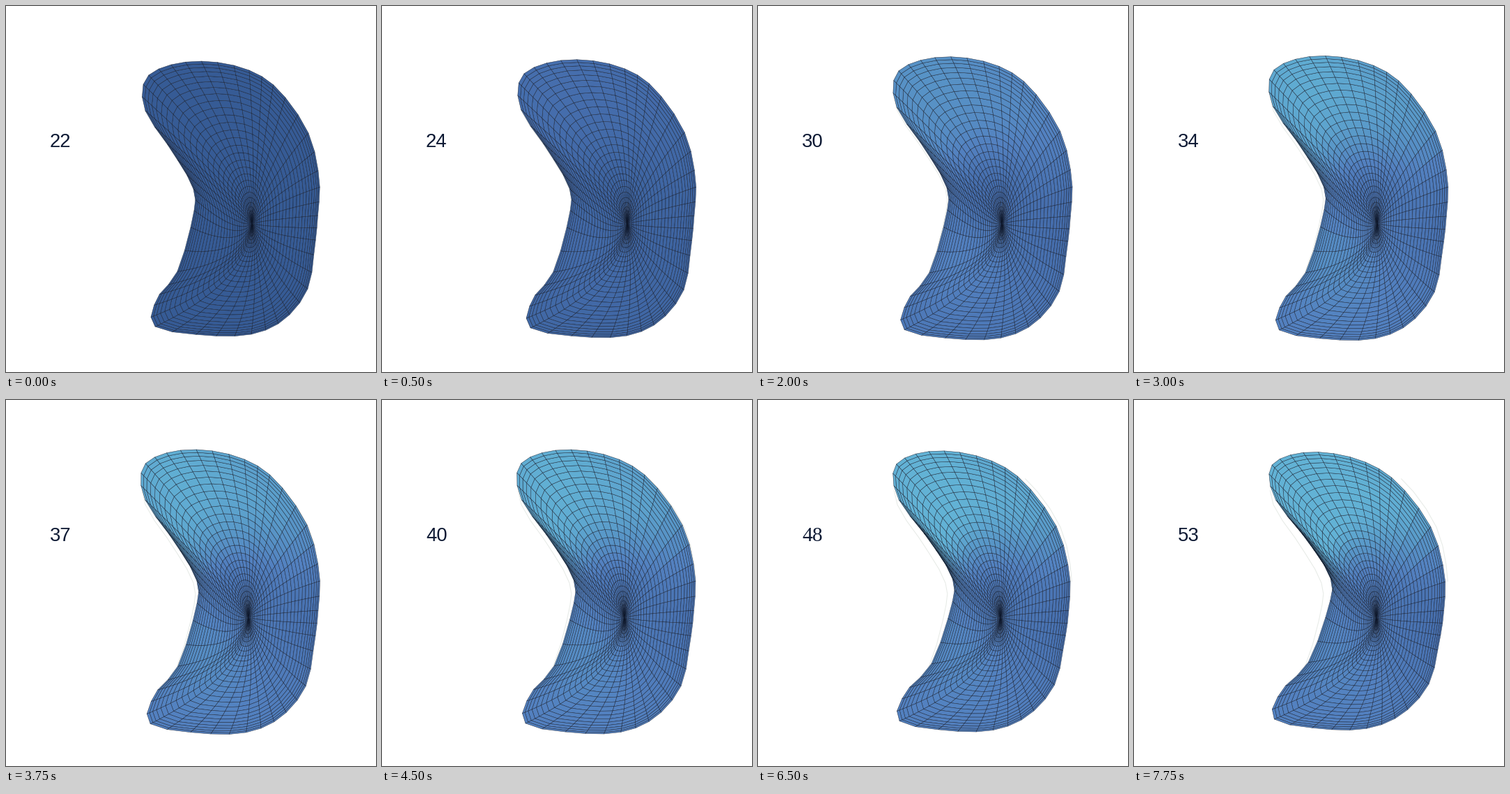
Write a matplotlib script that moves like this. It is 531x524 px and loops after 8000 ms.

```python
import numpy as np
import matplotlib.pyplot as plt
from matplotlib.animation import FuncAnimation
from matplotlib.collections import PolyCollection
from matplotlib.colors import LinearSegmentedColormap

W, H, DPI = 531, 524, 100
PX = 72 / DPI
FIRST, COUNT = 22, 32
SPOKES, RINGS = 50, 30

# Key points of the rim, clockwise from below the upper tip
KEYS = np.array([
    (200, 150), (200, 105), (237, 84), (292, 79.5), (349, 92), (392, 121),
    (434, 182), (449.5, 248), (447.5, 300), (443, 345), (433, 405), (399, 449),
    (352, 470), (288, 471.5), (214, 459), (216, 420), (246, 380), (268, 303),
    (269, 262), (239, 209)])

# Light and dark patches: x, y, radius, strength, extra strength by the end
PATCHES = [
    (235, 90, 105, .32, .12),
    (400, 160, 65, .10, .16),
    (255, 215, 45, .00, .25),
    (290, 365, 50, .20, -.12),
    (320, 262, 42, -.26, .06),
    (445, 310, 65, -.16, -.06)]

BLUES = LinearSegmentedColormap.from_list("blues", [
    (0, "#365b95"), (.35, "#456dac"), (.6, "#5381c0"), (.8, "#5896c7"),
    (1, "#62b2d5")])

# Angle of each spoke; the ninth points straight up
PHI = np.pi / 2 - 2 * np.pi * (np.arange(SPOKES) - 8) / SPOKES


def closed_spline(keys, count):
    """Catmull-Rom curve through a closed loop of points."""
    pos = np.arange(count) * len(keys) / count
    i = pos.astype(int)
    t = (pos - i)[:, None]
    a, b, c, d = (keys[(i + k) % len(keys)] for k in (-1, 0, 1, 2))
    return b + .5 * t * (c - a + t * (2*a - 5*b + 4*c - d + t * (3*(b - c) + d - a)))


RIM = closed_spline(KEYS, SPOKES)


def rim_at(u):
    """The rim drifts with u and swells for a while on the way."""
    drift = np.stack([-6 - 8*np.cos(PHI) + 11*np.cos(2*PHI) + 2*np.sin(2*PHI),
                      -2.5 + 4*np.cos(PHI) - 1.5*np.sin(PHI)], axis=1)
    swell = np.sin(np.pi * u ** .8)
    rim = RIM + drift * u ** 1.2
    return rim + swell * (rim - (325, 280)) * (.014, .031)


def quads_at(u):
    """Faces between rings that grow from narrow ellipses into the rim."""
    pole = np.array([353 - 5 * min(1, 2.2 * u), 311.5])
    core = np.stack([45 * np.cos(PHI), -175 * np.sin(PHI)], axis=1)
    t = np.linspace(0, 1, RINGS + 1)
    g = (.35 * t + .325 * (1 - np.cos(np.pi * t)))[:, None, None]
    p = pole + g * ((1 - g) * core + g * (rim_at(u) - pole))
    q = np.roll(p, -1, axis=1)
    return np.stack([p[:-1], q[:-1], q[1:], p[1:]], axis=2).reshape(-1, 4, 2)


def colors_at(u, quads):
    x, y = quads.mean(axis=1).T
    tone = np.full(len(x), .58)
    for px, py, r, strength, extra in PATCHES:
        d2 = (x - px) ** 2 + (y - py) ** 2
        tone += (strength + extra * u) * np.exp(-d2 / (2 * r * r))
    return BLUES(tone * min(1, np.sqrt(2.6 * u)))


fig = plt.figure(figsize=(W / DPI, H / DPI), dpi=DPI, facecolor="white")
ax = fig.add_axes([0, 0, 1, 1])
ax.set(xlim=(0, W), ylim=(H, 0))
ax.axis("off")

# Faint trace of the first rim, seen where the surface shrinks
for arc in (RIM[12:19], np.vstack([RIM[40:], RIM[:2]])):
    ax.plot(*arc.T, color="#e6eae6", lw=PX, zorder=1)

surface = PolyCollection([], edgecolors=(.05, .08, .14, .75),
                         linewidths=.55 * PX, zorder=2)
ax.add_collection(surface, autolim=False)
label = ax.text(78.2, 202, "", ha="center", va="baseline", color="#0e1a34")


def draw(i):
    u = i / (COUNT - 1)
    quads = quads_at(u)
    surface.set_verts(quads)
    surface.set_facecolor(colors_at(u, quads))
    n = FIRST + i
    serif = 41 <= n <= 49
    label.set_text(str(n))
    label.set_fontfamily("Liberation Serif" if serif else "Liberation Sans")
    label.set_fontsize((29.5 if serif else 27.5) * PX)
    return surface, label


anim = FuncAnimation(fig, draw, frames=COUNT, interval=250, repeat=True,
                     repeat_delay=0, blit=False)
plt.show()
```
